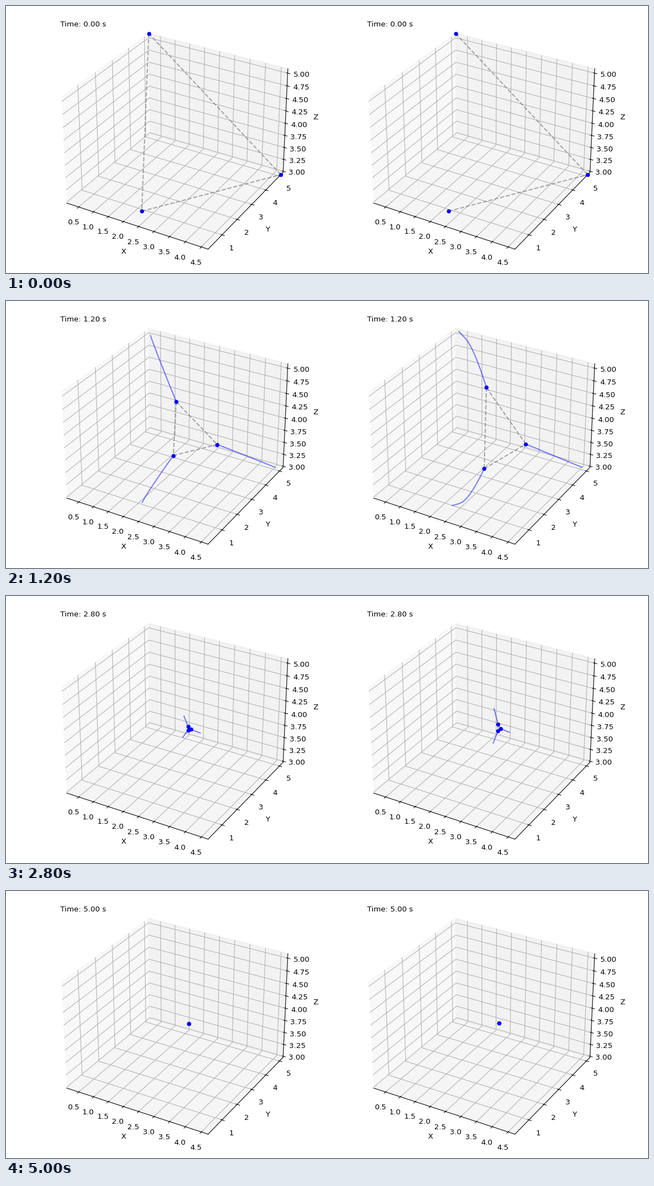
A matplotlib script that plays this animation: 1159 by 483 pixels, repeating every 5.1 s.

```python
import numpy as np
import matplotlib.pyplot as plt
from matplotlib.animation import FuncAnimation

W, H = 1159, 483
DPI = H / 5
FRAMES, INTERVAL = 51, 100
SIDE = 0.94 * H                     # square 3D axes, in pixels
CENTERS = (302.5, 856.5)
LIMITS = ((0.09, 4.71), (0.11, 5.273), (2.978, 5.088))
TRAIL = 10                          # frames of history shown

START = np.array([[0.09, 5.273, 5.088],
                  [2.61, 0.11, 3.31],
                  [4.71, 5.10, 2.978]])
PAIRS = ((0, 1), (0, 2), (1, 2))
GAIN, DAMPING = 1.25, 3.7
STEP, SUBSTEPS = 0.02, 5


def links(pos, reach):
    """Boolean adjacency: agents closer than reach see each other."""
    gap = np.linalg.norm(pos[:, None] - pos[None], axis=2)
    return (gap < reach) & ~np.eye(len(pos), dtype=bool)


def simulate(velocity, reach):
    """Damped second-order consensus; one state per frame."""
    pos, vel = START.copy(), np.array(velocity, float)
    path = [pos.copy()]
    for _ in range(FRAMES - 1):
        for _ in range(SUBSTEPS):
            adj = links(pos, reach).astype(float)
            pull = adj @ pos - adj.sum(axis=1, keepdims=True) * pos
            vel += STEP * (GAIN * pull - DAMPING * vel)
            pos += STEP * vel
        path.append(pos.copy())
    return np.array(path)


class Panel:
    def __init__(self, fig, center, velocity, reach):
        self.reach = reach
        self.path = simulate(velocity, reach)
        box = [(center - SIDE / 2) / W, 0.03, SIDE / W, SIDE / H]
        ax = fig.add_axes(box, projection="3d")
        self.edges = [ax.plot([], [], [], "--", color="gray", alpha=0.7)[0]
                      for _ in PAIRS]
        self.trails = [ax.plot([], [], [], "b-", alpha=0.5)[0] for _ in START]
        self.dots = [ax.plot([], [], [], "bo", markersize=4.5)[0]
                     for _ in START]
        self.clock = ax.text2D(0.05, 0.95, "", transform=ax.transAxes)
        ax.set(xlim=LIMITS[0], ylim=LIMITS[1], zlim=LIMITS[2],
               xlabel="X", ylabel="Y", zlabel="Z")

    def draw(self, i):
        pos = self.path[i]
        adj = links(pos, self.reach)
        for line, (a, b) in zip(self.edges, PAIRS):
            line.set_data_3d(*pos[[a, b]].T)
            line.set_visible(bool(adj[a, b]))
        recent = self.path[max(0, i - TRAIL):i + 1]
        for k, (trail, dot) in enumerate(zip(self.trails, self.dots)):
            trail.set_data_3d(*recent[:, k].T)
            dot.set_data_3d(*pos[k][:, None])
        self.clock.set_text(f"Time: {i * INTERVAL / 1000:.2f} s")
        return [*self.edges, *self.trails, *self.dots, self.clock]


# the tiny excess keeps the pixel size from being truncated
fig = plt.figure(figsize=((W + 0.001) / DPI, (H + 0.001) / DPI), dpi=DPI)
panels = [
    Panel(fig, CENTERS[0],
          [[-0.1, -0.3, 0], [-0.3, -0.8, 0], [0, 0, 0]], np.inf),
    Panel(fig, CENTERS[1],
          [[0.15, 0, 0], [0.1, 0, 0], [0, 0, 0]], 5.55),
]


def update(i):
    return [artist for panel in panels for artist in panel.draw(i)]


anim = FuncAnimation(fig, update, frames=FRAMES, interval=INTERVAL,
                     init_func=lambda: update(0), repeat=True,
                     repeat_delay=0, blit=False)
plt.show()
```
